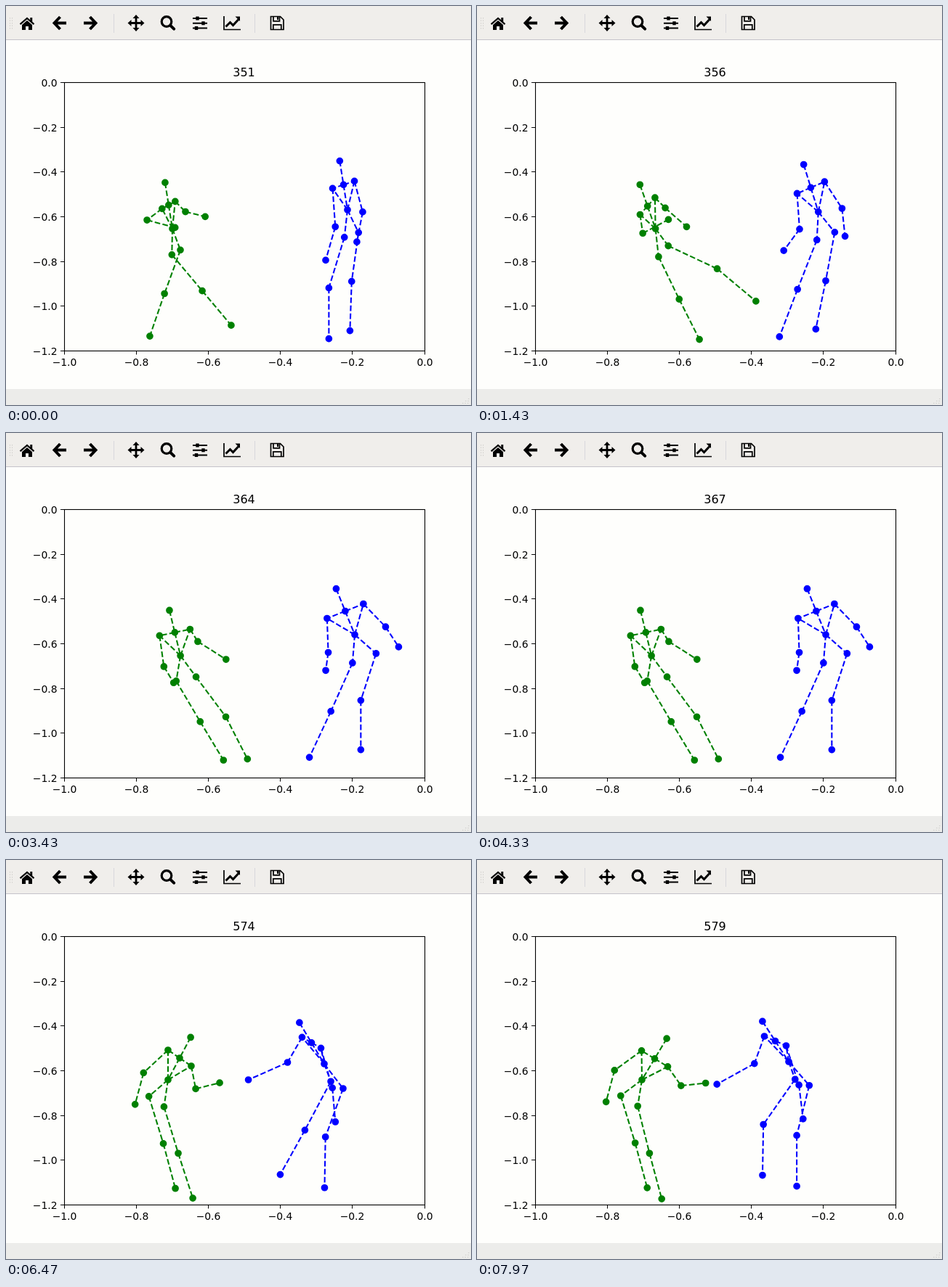
Write an HTML page that moves like this. It is 640x550 px and loops after 8 s.

```html
<!DOCTYPE html>
<html lang="en">
<head>
<meta charset="utf-8">
<title>Skeleton plot</title>
<style>
  html, body { margin: 0; width: 100%; height: 100%; overflow: hidden; background: #fefefc; }
  svg { display: block; width: 640px; height: 550px; }
  text { font: 13.9px "DejaVu Sans", sans-serif; fill: #000; }
  #title { font-size: 16px; text-anchor: middle; }
  .line { fill: none; stroke: #000; }
  .bones { fill: none; stroke-width: 2.08; stroke-dasharray: 7.7 3.33; }
  .joints { fill: none; stroke-width: 9.7; stroke-linecap: round; }
</style>
</head>
<body>
<svg viewBox="0 0 640 550">
  <rect width="640" height="550" fill="#fefefc"/>
  <rect width="640" height="46" fill="#f0eeeb"/>
  <rect y="528" width="640" height="22" fill="#ececea"/>
  <path d="M0 46.5H640" stroke="#c4c3ca"/>
  <path d="M148.5 11V37M342.5 11V37" stroke="#d8d7dc"/>
  <path d="M5.5 16V33M8.5 16V33M628 547.5H638M632 544.5H638M636 541.5H638"
        stroke="#cfcecb" stroke-dasharray="1.5 2"/>

  <!-- toolbar: home, back, forward, pan, zoom, sliders, chart, save -->
  <g>
    <path d="M22 26l7-6 7 6v7h-5v-5h-4v5h-5zM33.3 16h2.9v6h-2.9z"/>
    <path class="line" stroke-width="2.2" d="M19.5 25.2L29 17l9.5 8.2"/>
    <path class="line" stroke-width="4" d="M74.5 15l-8 8.5 8 8.5M66 23.5H83M115.5 15l8 8.5-8 8.5M124 23.5H107"/>
    <path class="line" stroke-width="2.8" d="M171 23.5h16M179 15.5v16"/>
    <path d="M179 12l4.5 5h-9zM179 35l4.5-5h-9zM167.5 23.5l5-4.5v9zM190.5 23.5l-5-4.5v9z"/>
    <circle class="line" cx="221" cy="21.5" r="6.8" stroke-width="3.2"/>
    <path class="line" stroke-width="4" stroke-linecap="round" d="M226.8 27.3l4.4 4.4"/>
    <path class="line" stroke-width="2" d="M257 17h20M257 23.8h20M257 30.5h20"/>
    <path class="line" stroke-width="4.4" d="M263.5 14.5v5M271.5 21.3v5M262 28v5"/>
    <path class="line" stroke-width="1.7" d="M300 14v18.5h23"/>
    <path class="line" stroke-width="3" d="M302.5 28.5l6-6 4 4 7.5-8"/>
    <path d="M315.5 14.5h6.5v6.5z"/>
    <path class="line" stroke-width="1.7" d="M364.5 14.5h13l4.5 4.5v13.5h-17.5zM368 14.5v6.3h8.5v-6.3M367.8 32.5v-6.7h11v6.7"/>
    <path d="M373 15h2.2v4H373z"/>
  </g>

  <text id="title" x="327.5" y="97"></text>
  <g id="axes"></g>
  <rect class="line" x="80.5" y="105.5" width="496" height="370" stroke-width="1.1"/>
  <g transform="translate(0 1)">
    <path class="bones" stroke="#008000"/><path class="joints" stroke="#008000"/>
    <path class="bones" stroke="#0000ff"/><path class="joints" stroke="#0000ff"/>
  </g>
</svg>
<script>
const LOOP = 8000, STEP = 270, PHASE = 0.4, CUT = 17, LAST = 29;
const { sin, cos, floor, PI } = Math;

const ramp = (v, from, to) => Math.min(1, Math.max(0, (v - from) / (to - from)));

// Angles are in degrees, measured from straight down towards the right.
const move = ([x, y], angle, length) =>
  [x + length * sin(angle * PI / 180), y + length * cos(angle * PI / 180)];

// A body is a straight spine with tilted shoulder and hip lines.
// Each limb reads: upper angle, upper length, lower angle, lower length.
function makeBody({ torso, size, lean, turn: [w, h], arms, legs }) {
  const neck = move(torso, lean, -size);
  const head = move(neck, lean, -size * 0.95);
  const pelvis = move(torso, lean, size);
  const joints = [head, neck, torso];
  const bones = [[head, neck], [neck, torso]];

  const addLimb = (root, side, scale, [a, upper, b, lower]) => {
    const start = [root[0] + side * w * scale, root[1] + side * h * scale];
    const middle = move(start, a, upper);
    const end = move(middle, b, lower);
    joints.push(start, middle, end);
    bones.push([torso, start], [start, middle], [middle, end]);
    if (root === neck) bones.push([neck, start]);
  };
  [-1, 1].forEach((side, i) => {
    addLimb(neck, side, 1, arms[i]);
    addLimb(pelvis, side, 0.65, legs[i]);
  });
  return { joints, bones };
}

// Green steps in and kicks, blue leans back and opens an arm.
function kickScene(step) {
  const go = ramp(step, 0, 8), back = ramp(step, 8, 13);
  const swing = sin(PI * Math.min(step, 13) / 16);
  const dip = sin(PI * go), late = go * go, peak = swing * swing;
  return [{
    torso: [229 + 20 * swing, 306], size: 33,
    lean: 9 + 15 * peak,
    turn: [9 + 2 * go + 10 * back, -5 - 8 * swing + 5 * back],
    arms: [[-53 + 98 * go - 37 * back, 26 + 17 * back, 75 + 69 * go - 113 * back, 40 - 14 * back],
           [45 - 13 * back, 20, 76 - 33 * swing, 28 + 18 * go]],
    legs: [[40 - 17 * swing, 65, 40 - 16 * swing, 62],
           [-20 + 102 * swing, 64 + 15 * peak, -19 + 83 * swing, 62 + 11 * peak]]
  }, {
    torso: [470 + 7 * go - 5 * dip + 3 * back, 280 + 3 * dip - 3 * back], size: 35,
    lean: 9 + 13 * go,
    turn: [15 + 10 * late, -5 - 5 * go],
    arms: [[4 - 2 * back, 53 - 6 * go, -16 - 14 * dip - 12 * go + 20 * back, 48 - 29 * late + 6 * back],
           [15 + 29 * go, 44, -11 + 44 * late, 42 - 9 * late]],
    legs: [[-17 - 7 * go, 73, -25 * sin(PI / 2 * go), 70],
           [-8 - 4 * go - 6 * back, 68, -2 - 9 * dip - 2 * go + 4 * back, 68]]
  }];
}

// Both lean towards each other and reach out until their hands meet.
function reachScene(step) {
  const rise = ramp(step, 19, 24), settle = ramp(step, 24, 29);
  return [{
    torso: [222 + rise + 4 * settle, 302], size: 34,
    lean: -12 - 16 * rise - 3 * settle,
    turn: [9 + 7 * rise + 2 * settle, 9 + 2 * rise],
    arms: [[-5 - 42 * rise - 7 * settle, 43 + 3 * rise, 40 - 55 * rise, 45],
           [11 + 24 * settle, 37 - 5 * rise, 72 + 32 * rise - 8 * settle, 47 - 13 * rise]],
    legs: [[12 + 5 * rise, 68, 10 + 5 * rise, 64],
           [7 + 10 * rise - 3 * settle, 67, 6 + 12 * rise - 3 * settle, 65]]
  }, {
    torso: [445 - 7 * rise - 9 * settle, 283 - 3 * rise - 3 * settle], size: 34,
    lean: 23 + 8 * rise + 2 * settle,
    turn: [4 + 9 * rise + 2 * settle, 10.5 - 3 * rise - settle],
    arms: [[-39 + 9 * rise + 10 * settle, 45 - 5 * rise, -58 - 8 * rise + 5 * settle, 59],
           [1 + 15 * rise + 2 * settle, 57, -14 + 19 * rise + 2 * settle, 47]],
    legs: [[-13 - 15 * rise - 7 * settle, 72 + 4 * rise, -9 - 20 * rise + 28 * settle, 70],
           [-10 - 10 * rise + 6 * settle, 67 + 4 * rise, -10 + 9 * rise + settle, 63 + 7 * rise]]
  }];
}

function drawAxes() {
  const label = v => (v ? '\u2212' : '') + v.toFixed(1);
  let marks = '';
  for (let i = 0; i <= 6; i++) {
    const y = floor(105.6 + i * 61.6) + 0.5;
    marks += `<path class="line" d="M80 ${y}h-5"/>
      <text x="70.5" y="${y + 5.5}" text-anchor="end">${label(i / 5)}</text>`;
  }
  for (let i = 0; i <= 5; i++) {
    const x = floor(80 + i * 99.2) + 0.5;
    marks += `<path class="line" d="M${x} 475.5v5"/>
      <text x="${x}" y="496" text-anchor="middle">${label(1 - i / 5)}</text>`;
  }
  document.getElementById('axes').innerHTML = marks;
}

const title = document.getElementById('title');
const bonePaths = document.querySelectorAll('.bones');
const jointPaths = document.querySelectorAll('.joints');
let shown = -1;

function render() {
  const time = performance.now() % LOOP;
  const step = Math.min(LAST, floor(time / STEP + PHASE));
  if (step !== shown) {
    shown = step;
    const kicking = step < CUT;
    title.textContent = step + (kicking ? 351 : 550);
    (kicking ? kickScene : reachScene)(step).map(makeBody).forEach(({ joints, bones }, i) => {
      bonePaths[i].setAttribute('d', bones.map(([a, b]) => `M${a}L${b}`).join(''));
      jointPaths[i].setAttribute('d', joints.map(p => `M${p}h0`).join(''));
    });
  }
  requestAnimationFrame(render);
}

drawAxes();
render();
</script>
</body>
</html>
```
